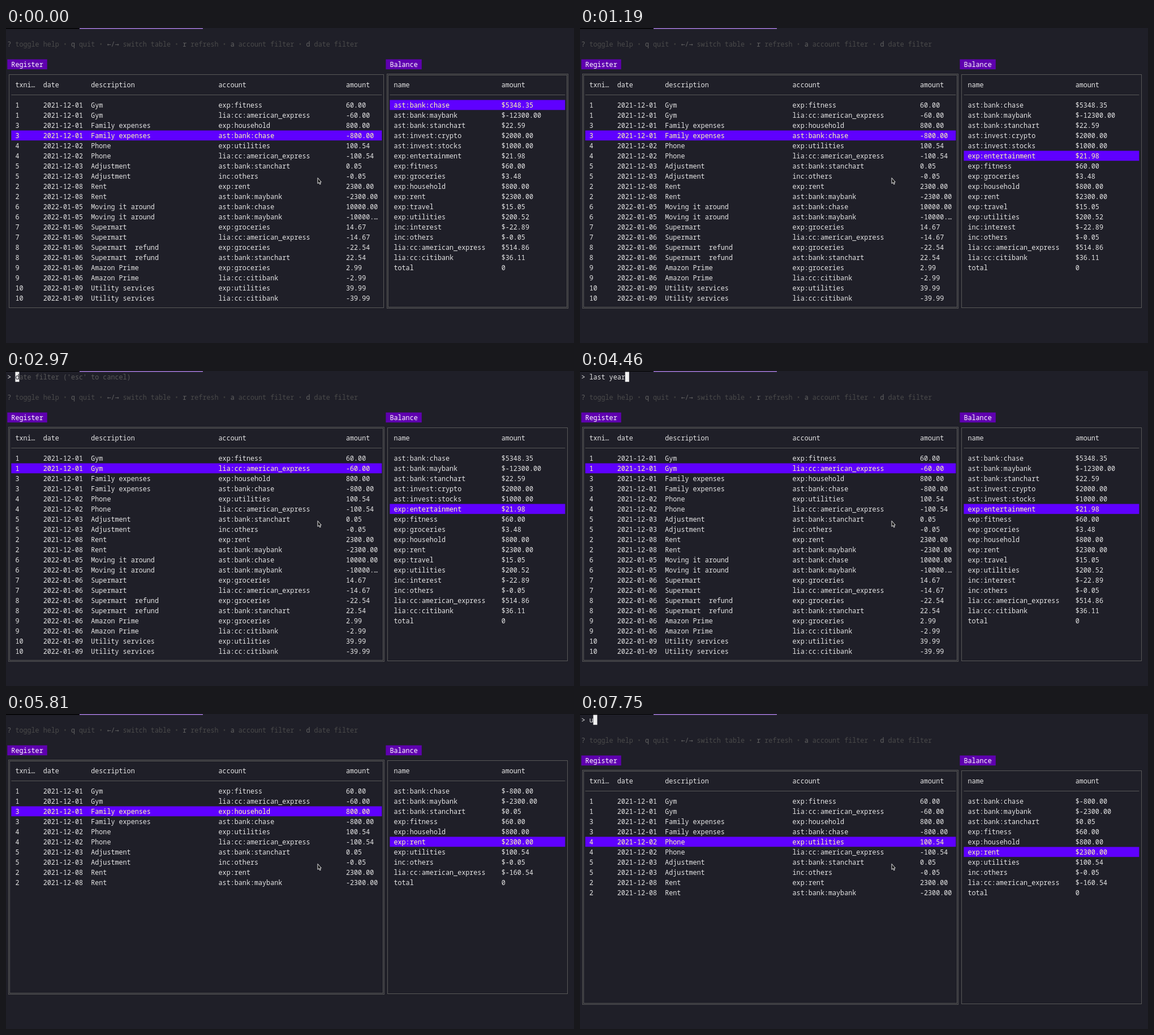
Recreate the animation shown at these times as an HTML page with a canvas. Size 1004 by 558 pixels, loop 8 s.

```html
<!DOCTYPE html>
<html lang="en">
<head>
<meta charset="utf-8">
<style>
html, body { margin: 0; overflow: hidden; background: #1f1f28; }
canvas { display: block; }
</style>
</head>
<body>
<canvas id="stage" width="1004" height="558"></canvas>
<script>
const ctx = document.getElementById('stage').getContext('2d');
const LOOP = 8000, CELL = 7.043, LINE = 18;
const BG = '#1f1f28', TEXT = '#e6e6e6', DIM = '#585858', SELECTED = '#5f00ff';
const FONT = '11.74px "Noto Sans Mono", "DejaVu Sans Mono", monospace';
const ARROW_FONT = '11.74px "DejaVu Sans Mono", monospace';

const parse = text => text.trim().split('\n').map(row => row.split('|'));

const register = parse(`
1|2021-12-01|Gym|exp:fitness|60.00
1|2021-12-01|Gym|lia:cc:american_express|-60.00
3|2021-12-01|Family expenses|exp:household|800.00
3|2021-12-01|Family expenses|ast:bank:chase|-800.00
4|2021-12-02|Phone|exp:utilities|100.54
4|2021-12-02|Phone|lia:cc:american_express|-100.54
5|2021-12-03|Adjustment|ast:bank:stanchart|0.05
5|2021-12-03|Adjustment|inc:others|-0.05
2|2021-12-08|Rent|exp:rent|2300.00
2|2021-12-08|Rent|ast:bank:maybank|-2300.00
6|2022-01-05|Moving it around|ast:bank:chase|10000.00
6|2022-01-05|Moving it around|ast:bank:maybank|-10000.…
7|2022-01-06|Supermart|exp:groceries|14.67
7|2022-01-06|Supermart|lia:cc:american_express|-14.67
8|2022-01-06|Supermart  refund|exp:groceries|-22.54
8|2022-01-06|Supermart  refund|ast:bank:stanchart|22.54
9|2022-01-06|Amazon Prime|exp:groceries|2.99
9|2022-01-06|Amazon Prime|lia:cc:citibank|-2.99
10|2022-01-09|Utility services|exp:utilities|39.99
10|2022-01-09|Utility services|lia:cc:citibank|-39.99`);

const balance = parse(`
ast:bank:chase|$5348.35
ast:bank:maybank|$-12300.00
ast:bank:stanchart|$22.59
ast:invest:crypto|$2000.00
ast:invest:stocks|$1000.00
exp:entertainment|$21.98
exp:fitness|$60.00
exp:groceries|$3.48
exp:household|$800.00
exp:rent|$2300.00
exp:travel|$15.05
exp:utilities|$200.52
inc:interest|$-22.89
inc:others|$-0.05
lia:cc:american_express|$514.86
lia:cc:citibank|$36.11
total|0`);

const balanceLastYear = parse(`
ast:bank:chase|$-800.00
ast:bank:maybank|$-2300.00
ast:bank:stanchart|$0.05
exp:fitness|$60.00
exp:household|$800.00
exp:rent|$2300.00
exp:utilities|$100.54
inc:others|$-0.05
lia:cc:american_express|$-160.54
total|0`);

const help = [['?', 'toggle help'], ['q', 'quit'], ['←/→', 'switch table'],
  ['r', 'refresh'], ['a', 'account filter'], ['d', 'date filter']];

// Each entry is [start time, value]
const balanceRow = [[0, 0], [450, 1], [600, 2], [740, 3], [890, 4], [1040, 5]];
const registerRow = [[0, 3], [1630, 2], [1780, 1], [5810, 2], [6110, 3], [6260, 4]];
const dateTyped = [[2970, 0], [3420, 1], [3570, 2], [3720, 3], [3870, 4],
  [4010, 5], [4160, 7], [4310, 8], [4460, 9]];
const valueAt = (steps, t) => steps.findLast(([start]) => t >= start)[1];

const colX = col => 2.3 + col * CELL;

function rect(x, y, w, h, color) {
  ctx.fillStyle = color;
  ctx.fillRect(x, y, w, h);
}

// Fills terminal cells from one column up to another
const fillCells = (from, to, line, color) =>
  rect(colX(from), 1.5 + line * LINE, (to - from) * CELL, 17.7, color);

// Places every character on the terminal grid and returns the next column
function write(text, col, line, color = TEXT) {
  ctx.fillStyle = color;
  for (const char of text) {
    ctx.font = '←→'.includes(char) ? ARROW_FONT : FONT;
    ctx.fillText(char, colX(col++), 15 + line * LINE);
  }
  return col;
}

function drawHelp(line) {
  let col = 0;
  help.forEach(([key, action], i) => {
    if (i) col = write(' • ', col, line, '#3c3c3c');
    col = write(key, col, line, '#626262');
    col = write(' ' + action, col, line, '#4a4a4a');
  });
}

function drawTable(table, rows, selected, focused, offset) {
  const { title, col, end, left, right, headers, cols } = table;
  const shift = offset * LINE;
  const writeRow = (cells, line, color) =>
    cells.forEach((cell, i) => write(cell, cols[i], line, color));

  fillCells(col, col + title.length + 2, 3 + offset, '#5f00af');
  write(title, col + 1, 3 + offset, '#ffffff');

  ctx.strokeStyle = DIM;
  for (const d of focused ? [-1, 1] : [0])
    ctx.strokeRect(left + d, 82.5 + d + shift, right - left - 2 * d, 413 - 2 * d);
  rect(colX(col + 1), 118 + shift, (end - col - 1) * CELL, 1, DIM);

  writeRow(headers, 5 + offset);
  rows.forEach((cells, i) => {
    const line = 7 + i + offset;
    if (i === selected) fillCells(col + 1, end, line, SELECTED);
    writeRow(cells, line, i === selected ? '#ffffaf' : TEXT);
  });
}

const registerTable = { title: 'Register', col: 0, end: 94, left: 5.5, right: 667.5,
  headers: ['txni…', 'date', 'description', 'account', 'amount'], cols: [2, 9, 21, 53, 85] };
const balanceTable = { title: 'Balance', col: 95, end: 140, left: 674.5, right: 992.5,
  headers: ['name', 'amount'], cols: [97, 124] };

function drawPrompt(placeholder, typed) {
  write('>', 0, 0);
  const cursor = write(typed, 2, 0);
  fillCells(cursor, cursor + 1, 0, '#f0f0f0');
  if (!typed) {
    write(placeholder[0], cursor, 0, BG);
    write(placeholder.slice(1) + " filter ('esc' to cancel)", cursor + 1, 0, DIM);
  }
}

function drawPointer() {
  ctx.fillStyle = '#111';
  ctx.strokeStyle = '#e8e8e8';
  const arrow = new Path2D('M551 265.5V275.5L553.2 273.6L554.8 277L556.3 276.2L554.8 273H557.4Z');
  ctx.fill(arrow);
  ctx.stroke(arrow);
}

function draw(t) {
  const dateOpen = t >= 2970 && t < 4910;
  const accountOpen = t >= 7150;
  const offset = dateOpen || accountOpen ? 1 : 0;
  const filtered = t >= 4910;

  rect(0, 0, 1004, 558, BG);
  rect(0, 0, 130, offset ? 1 : 1.5, '#000');
  rect(130, 0, 218, 1.5, '#a67bdc');

  if (dateOpen) drawPrompt('date', 'last year'.slice(0, valueAt(dateTyped, t)));
  if (accountOpen) drawPrompt('account', t < 7750 ? '' : 'u');
  drawHelp(1 + offset);
  drawTable(registerTable, filtered ? register.slice(0, 10) : register,
    valueAt(registerRow, t), t >= 1190, offset);
  drawTable(balanceTable, filtered ? balanceLastYear : balance,
    valueAt(balanceRow, t), t < 1190, offset);
  drawPointer();
}

const began = performance.now();
function tick() {
  draw((performance.now() - began) % LOOP);
  requestAnimationFrame(tick);
}
tick();
</script>
</body>
</html>
```
